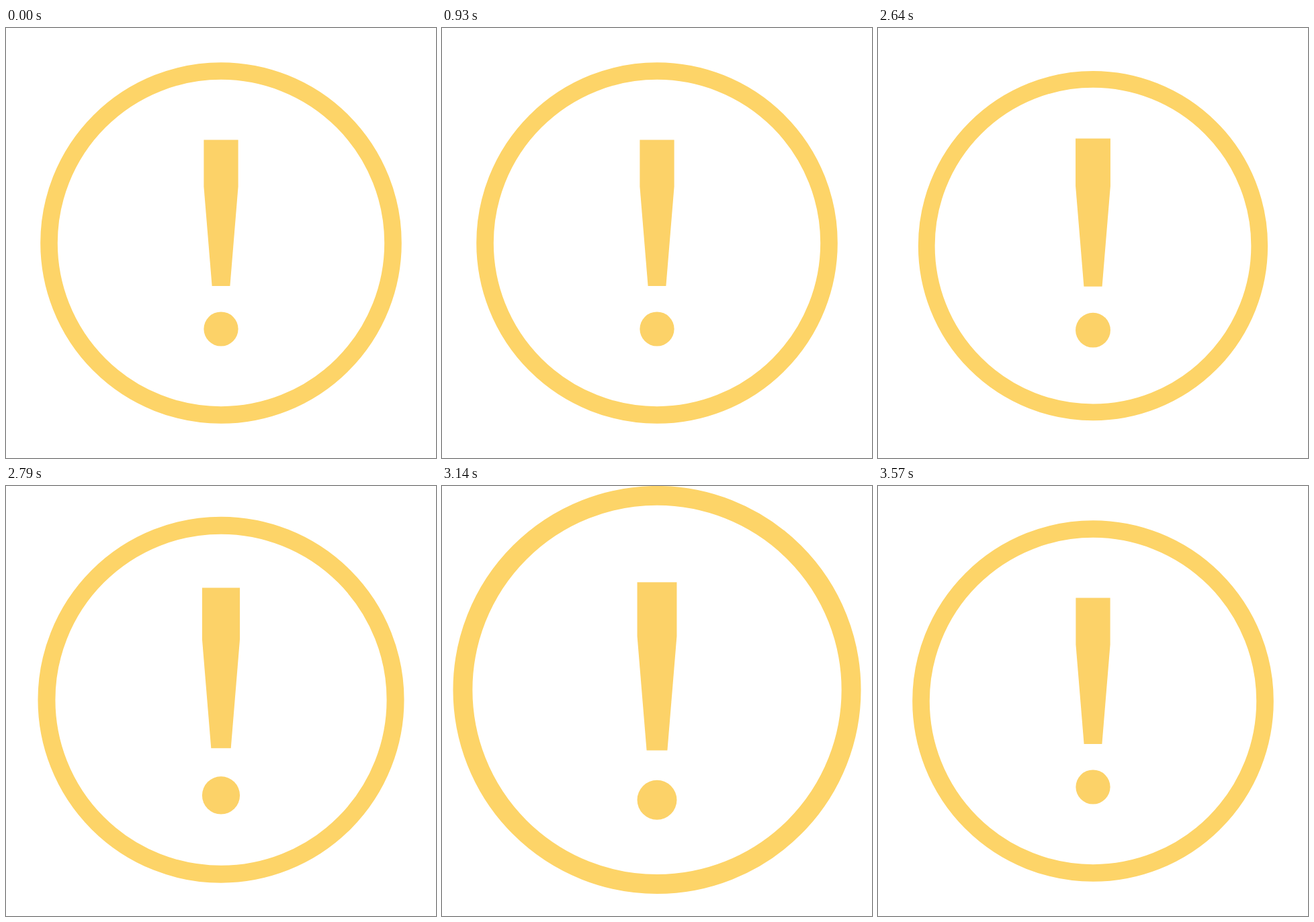
These frames come from a looping animation (640 by 640 pixels, 7.21 s). An HTML page:

```html
<!DOCTYPE html>
<html lang="en">
<head>
<meta charset="utf-8">
<title>Alert</title>
<style>
  html, body { margin: 0; width: 100%; height: 100%; overflow: hidden; background: #fff; }
  svg { display: block; width: 100%; height: 100%; }
</style>
</head>
<body>
<svg viewBox="0 0 640 640">
  <circle id="ring" cx="320" cy="320" r="256" fill="none" stroke="#fdd468" stroke-width="25.6"/>
  <g id="mark" fill="#fcd268">
    <path d="M294.4 166.4H345.6V236L333.4 384H306.6L294.4 236Z"/>
    <circle cx="320" cy="448" r="25.6"/>
  </g>
</svg>
<script>
const LOOP = 7210;
const RATE = 14; // poses per second
const CENTER = 320;
const DOT = 448;

const ring = document.getElementById('ring');
const mark = document.getElementById('mark');

// Poses change on the nearest hundredth of a second.
const poseAt = ms => Math.floor((Math.floor(ms / 10) * 10 + 5) * RATE / 1000);

// Linear progress from 0 to 1 between two poses.
const ramp = (pose, from, to) => Math.min(1, Math.max(0, (pose - from) / (to - from)));

// Lean right with a short pause, swing left, settle upright.
const tilt = pose =>
  2.5 * (ramp(pose, 5, 7) + ramp(pose, 8, 9)) - 10 * ramp(pose, 9, 11) + 5 * ramp(pose, 11, 13);

// Shrink a little, swell, return to full size.
const pulse = (pose, low, high, release) =>
  1 - 0.05 * ramp(pose, 33.5, low) + 0.2 * ramp(pose, low, high) - 0.15 * ramp(pose, release, 50);

const scaleAbout = (y, s) => `translate(${CENTER} ${y}) scale(${s}) translate(${-CENTER} ${-y})`;

function draw(ms) {
  const pose = poseAt(ms);
  ring.setAttribute('transform', scaleAbout(DOT, pulse(pose, 36.23, 44.9, 45)));
  mark.setAttribute('transform',
    `${scaleAbout(CENTER, pulse(pose, 35.5, 40.25, 45))} rotate(${tilt(pose)} ${CENTER} ${DOT})`);
}

const start = performance.now();
function tick() {
  draw((performance.now() - start) % LOOP);
  requestAnimationFrame(tick);
}
tick();
</script>
</body>
</html>
```
